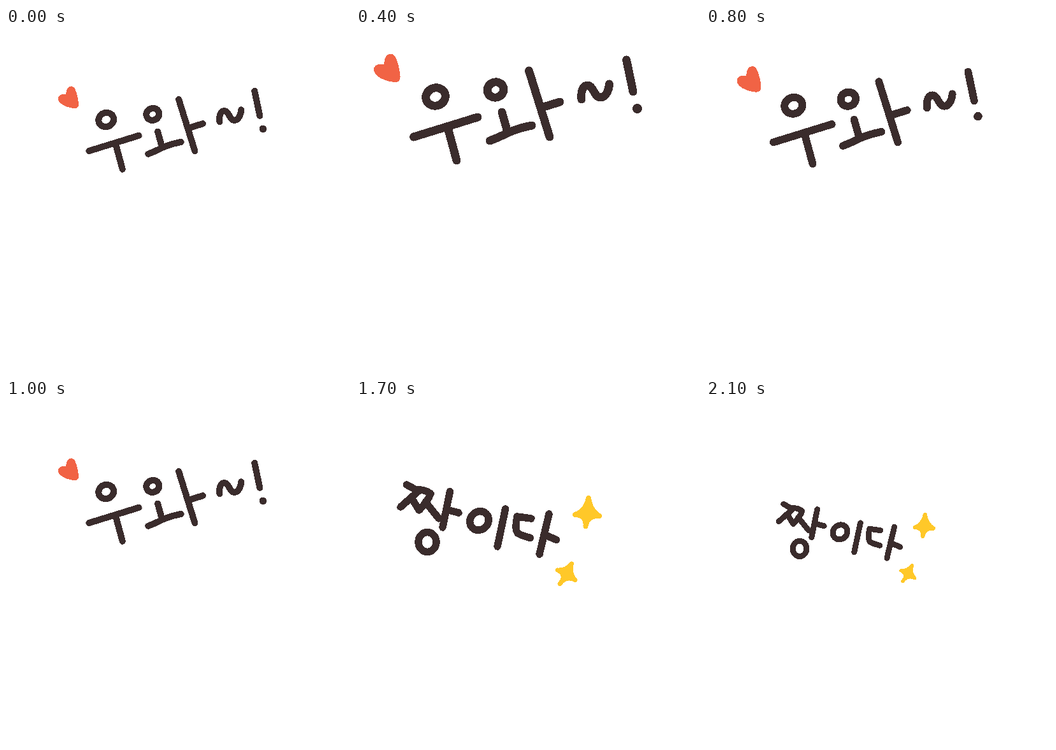
These frames come from a looping animation (540 by 540 pixels, 2200 ms). An HTML page:

```html
<!DOCTYPE html>
<html lang="ko">
<head>
<meta charset="utf-8">
<title>우와~! 짱이다</title>
<style>
  html, body { margin: 0; width: 100%; height: 100%; overflow: hidden; background: #fff; }
  svg { display: block; width: 100vw; height: 100vh; }
  .ink { fill: none; stroke: #3a2c2c; stroke-linecap: round; stroke-linejoin: round; }
  .star { fill: #ffc829; stroke: #ffc829; stroke-linejoin: round; }
</style>
</head>
<body>
<svg viewBox="0 0 540 540" shape-rendering="crispEdges">
  <g id="wow">
    <path fill="#f16345" d="M44 57C44 38 59 36 63 48C66 55 69 66 69.5 76C70 83 66 85 61 85C52 85 38 80 32 74C26 68 27 60 33 58C37 56 41 57 44 57Z"/>
    <g class="ink" stroke-width="13">
      <!-- 우 -->
      <ellipse cx="125" cy="108" rx="15.5" ry="14" transform="rotate(-20 125 108)"/>
      <path d="M90.5 171L191 140M145 160L158 208"/>
      <!-- 와 -->
      <ellipse cx="219" cy="97" rx="13" ry="12" transform="rotate(-20 219 97)"/>
      <path d="M229 132L237 160M210 177Q228 170 237 165Q255 157 276 153"/>
      <path d="M271.5 67L304 171M291 125L320 116"/>
      <!-- ~! -->
      <path d="M354 112C352 92 362 86 369 93C375 100 376 109 384 109C392 109 397 98 397.5 88"/>
      <path d="M424.5 50L435 100"/>
    </g>
    <circle cx="441.5" cy="126.5" r="7.5" fill="#3a2c2c"/>
  </g>
  <g id="best">
    <g class="ink" stroke-width="11.5">
      <!-- 짱 -->
      <path d="M79.5 133L94 141Q108 140 117 147Q113 159 99 173L88 155M98 143L70 168M109 160L130 186"/>
      <path d="M147.5 143.5L136 200M142 172L161 177"/>
      <ellipse cx="112" cy="223" rx="14" ry="15.5"/>
      <!-- 이 -->
      <ellipse cx="193.5" cy="189.5" rx="15.5" ry="14" transform="rotate(-45 193.5 189.5)"/>
      <path d="M234.5 171L222 230"/>
      <!-- 다 -->
      <path d="M275 186L253 183C251 192 249 204 254 209C259 213 266 214 273.5 216.5"/>
      <path d="M303 179L288 242M295 211L314.5 219.5"/>
    </g>
    <path class="star" stroke-width="8" d="M365 154Q368 174 382 182Q363 181 360.5 198Q362 181 344 180Q361 174 365 154Z"/>
    <path class="star" stroke-width="7" d="M338.5 257Q334 272 344 282.5Q330 275 320 288.5Q332 275 316.5 267Q330 268 338.5 257Z"/>
  </g>
</svg>
<script>
  const STEP = 100, COUNT = 11;
  const words = [document.getElementById("wow"), document.getElementById("best")];

  // Swell from 1 to 1.3 and back in ten steps.
  const swell = n => 1 + 0.3 * Math.sin(Math.PI * n / 10);
  const DRAWN = swell(4); // the artwork is drawn at this size

  function render() {
    const n = Math.floor(performance.now() / STEP) % (COUNT * 2);
    const active = Math.floor(n / COUNT);
    const scale = swell(n % COUNT) / DRAWN;
    words.forEach((word, i) => {
      word.setAttribute("visibility", i === active ? "visible" : "hidden");
      word.setAttribute("transform", `translate(270 270) scale(${scale}) translate(-270 -270)`);
    });
    requestAnimationFrame(render);
  }
  render();
</script>
</body>
</html>
```
